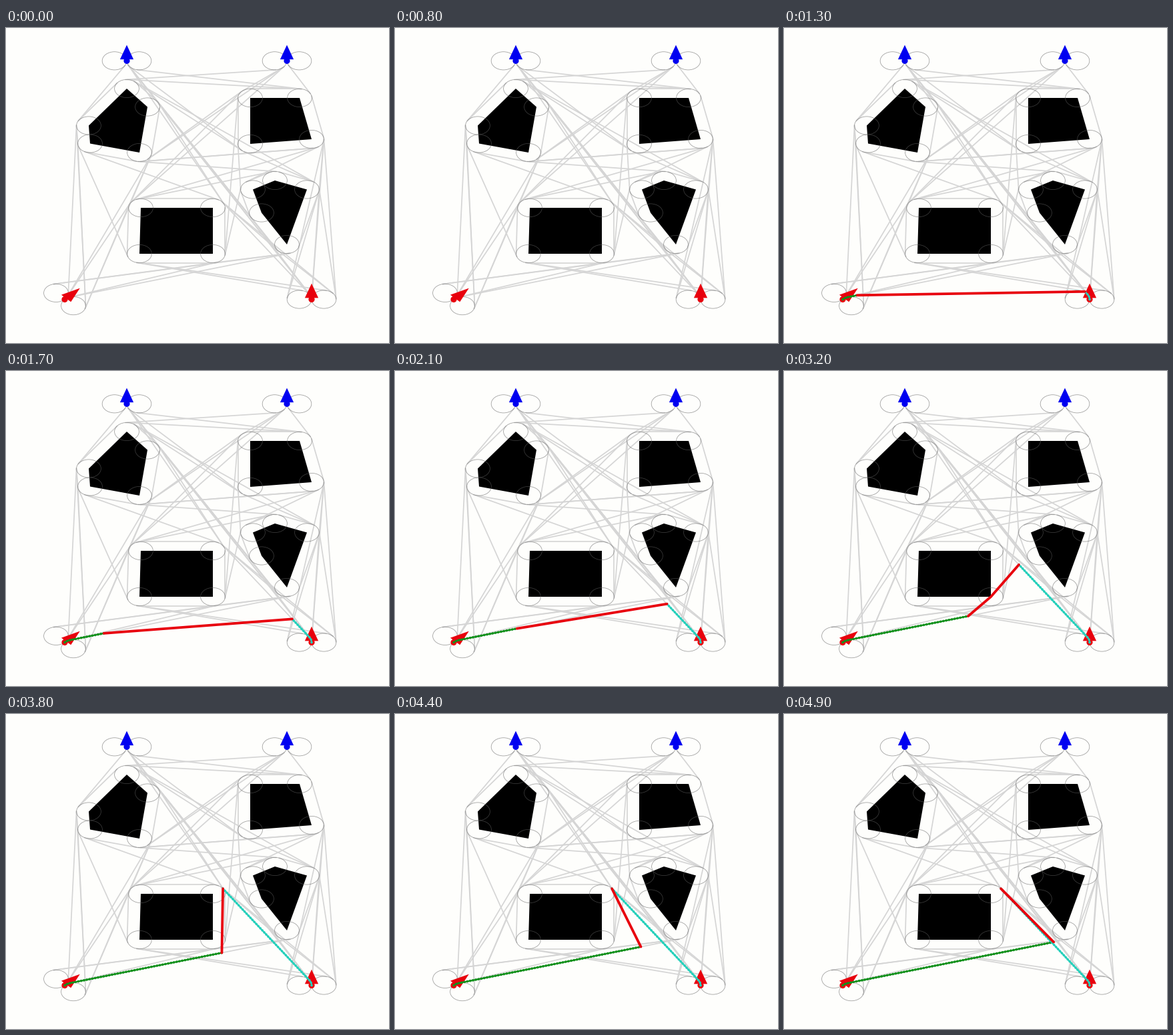
A matplotlib script that plays this animation: 574 px wide and 473 px high, repeating every 5 s.

```python
import itertools

import numpy as np
import matplotlib.pyplot as plt
from matplotlib.animation import FuncAnimation
from matplotlib.patches import Circle, Ellipse, Polygon

W, H, DPI = 574, 473, 100
FRAMES, STEP_MS = 50, 100
PX = 72 / DPI
UNIT = np.array([18.4, 13.6])  # pixels per turning radius, x and y

RED, BLUE = "#e8000d", "#0000f0"
GREEN, TEAL = "#12911c", "#25d0bb"

OBSTACLES = [
    [(181, 91), (212, 118.5), (200, 187), (126, 173.5), (124, 146.5)],
    [(366, 105), (440, 105), (458, 167), (366, 174)],
    [(403, 229), (451, 242.5), (421, 325), (383, 277.5), (370, 242.5)],
    [(202, 270), (310, 270), (310, 339), (200, 339)],
]
LEFT_START, RIGHT_START = ((88, 407.5), 45), ((458, 407.5), 90)
STARTS = [LEFT_START, RIGHT_START]
GOALS = [((181, 49.3), 90), ((421, 49.3), 90)]


def heading(deg):
    a = np.radians(deg)
    return np.array([np.cos(a), -np.sin(a)])


def right_of(d):
    return np.array([-d[1], d[0]])


def turn_circles(pos, deg):
    """Centres of the left and right turning circles, in radius units."""
    p, side = np.array(pos) / UNIT, right_of(heading(deg))
    return p - side, p + side


def tangent(c1, s1, c2, s2):
    """Line touching two unit circles; s = +1 touches on the right-hand side."""
    d = c2 - c1
    dist = np.hypot(*d)
    k = (s1 - s2) / dist
    if abs(k) >= 1:
        return None
    u = d / dist
    n = u * k + right_of(u) * np.sqrt(1 - k * k)
    return c1 + s1 * n, c2 + s2 * n


SHAPES = [np.array(o) / UNIT for o in OBSTACLES]
EDGE_A = np.concatenate(SHAPES)
EDGE_B = np.concatenate([np.roll(s, -1, axis=0) for s in SHAPES])


def cross(a, b):
    return a[..., 0] * b[..., 1] - a[..., 1] * b[..., 0]


def is_clear(p, q):
    """True if the segment crosses no obstacle edge."""
    d, e = q - p, EDGE_B - EDGE_A
    splits_edge = cross(d, EDGE_A - p) * cross(d, EDGE_B - p) < 0
    splits_line = cross(e, p - EDGE_A) * cross(e, q - EDGE_A) < 0
    return not (splits_edge & splits_line).any()


def make_nodes():
    """Each node: kind, centre, allowed sides, test on the touching normal."""
    nodes = []
    for pos, deg in STARTS:
        for c in turn_circles(pos, deg):
            nodes.append(("start", c, (1, -1),
                          lambda n, d=heading(deg): n @ d >= 0))
    for shape in SHAPES:
        for v in shape:
            nodes.append(("corner", v, (1, -1),
                          lambda n, arms=shape - v: (arms @ n).max() < 0.05))
    for pos, deg in GOALS:
        for c, side in zip(turn_circles(pos, deg), (1, -1)):
            nodes.append(("goal", c, (side,),
                          lambda n, d=heading(deg): n @ d <= 0))
    return nodes


def roadmap():
    lines = []
    for (k1, c1, sides1, ok1), (k2, c2, sides2, ok2) in itertools.combinations(make_nodes(), 2):
        if k1 == k2 != "corner":
            continue
        for s1, s2 in itertools.product(sides1, sides2):
            line = tangent(c1, s1, c2, s2)
            if line is None:
                continue
            p, q = line
            if ok1(p - c1) and ok2(q - c2) and is_clear(p, q):
                lines.append(np.array(line) * UNIT)
    return lines


class Route:
    """A turn away from the start, then a straight run that grazes a corner."""

    def __init__(self, start, turn, corner, first_frame):
        pos, deg = start
        left, right = turn_circles(pos, deg)
        centre = left if turn > 0 else right
        p, q = tangent(centre, turn, corner, 1)
        arms = np.array([np.array(pos) / UNIT - centre, p - centre])
        a, b = np.unwrap(np.arctan2(arms[:, 1], arms[:, 0]))
        ang = np.linspace(a, b, 12)
        arc = centre + np.column_stack([np.cos(ang), np.sin(ang)])
        self.pts = np.vstack([arc, q])
        steps = np.hypot(*np.diff(self.pts, axis=0).T)
        self.dist = np.append(0, np.cumsum(steps))
        self.first_frame = first_frame

    def travelled(self, i):
        """Pixel points passed by frame i, ending at the current place."""
        k = max(i - self.first_frame, 0)
        s = 0.538 * k - 0.0019 * k * k  # slows down gently
        now = [np.interp(s, self.dist, axis) for axis in self.pts.T]
        return np.vstack([self.pts[self.dist < s], now]) * UNIT


fig = plt.figure(figsize=(W / DPI, H / DPI), dpi=DPI, facecolor="#fefefc")
ax = fig.add_axes([0, 0, 1, 1])
ax.set_xlim(0, W)
ax.set_ylim(H, 0)
ax.axis("off")


def draw_ring(centre):
    ax.add_patch(Ellipse(centre, *(2 * UNIT), fill=False, ec="#606060",
                         alpha=0.6, lw=0.8 * PX, zorder=3))


def draw_robot(pos, deg, color):
    d = heading(deg)
    side = right_of(d) * 0.55
    local = np.array([d * 1.75, d * 0.16 + side, d * 0.16 - side])
    ax.add_patch(Polygon(np.array(pos) + local * UNIT, fc=color, ec="none", zorder=4))
    ax.add_patch(Circle(pos, 4.6, fc=color, ec="none", zorder=4))


def draw_scene():
    for seg in roadmap():
        ax.plot(*seg.T, color="#d5d5d5", lw=1.7 * PX, zorder=1)
    for shape in OBSTACLES:
        ax.add_patch(Polygon(shape, fc="black", ec="none", zorder=2))
        for v in shape:
            draw_ring(v)
    for robots, color in ((STARTS, RED), (GOALS, BLUE)):
        for pos, deg in robots:
            for c in turn_circles(pos, deg):
                draw_ring(c * UNIT)
            draw_robot(pos, deg, color)


def make_trail(color):
    core, = ax.plot([], [], color=color, lw=2.3 * PX, zorder=5)
    dots, = ax.plot([], [], color=color, lw=3.7 * PX, zorder=5,
                    ls=(0, (0.01, 1.15)), dash_capstyle="round")
    return core, dots


def tether_points(a, b):
    """Straight line from a to b, bent where the box corner is in the way."""
    corner = np.array(OBSTACLES[3][2])
    if a[0] < corner[0] < b[0] and cross(b - a, corner - a) > 0:
        return np.array([a, corner, b])
    return np.array([a, b])


draw_scene()
box, kite = SHAPES[3], SHAPES[2]
left_route = Route(LEFT_START, -1, kite[2], 10.6)
right_route = Route(RIGHT_START, 1, box[1], 11.2)
left_trail = make_trail(GREEN)
right_trail = make_trail(TEAL)
tether, = ax.plot([], [], color=RED, lw=3.8 * PX, zorder=6,
                  solid_capstyle="round", solid_joinstyle="round")
moving = [*left_trail, *right_trail, tether]


def update(i):
    active = i > left_route.first_frame
    for line in moving:
        line.set_visible(active)
    if active:
        left, right = left_route.travelled(i), right_route.travelled(i)
        for trail, pts in ((left_trail, left), (right_trail, right)):
            for line in trail:
                line.set_data(*pts.T)
        tether.set_data(*tether_points(left[-1], right[-1]).T)
    return moving


anim = FuncAnimation(fig, update, frames=FRAMES, interval=STEP_MS,
                     repeat=True, repeat_delay=0, blit=False)
plt.show()
```
